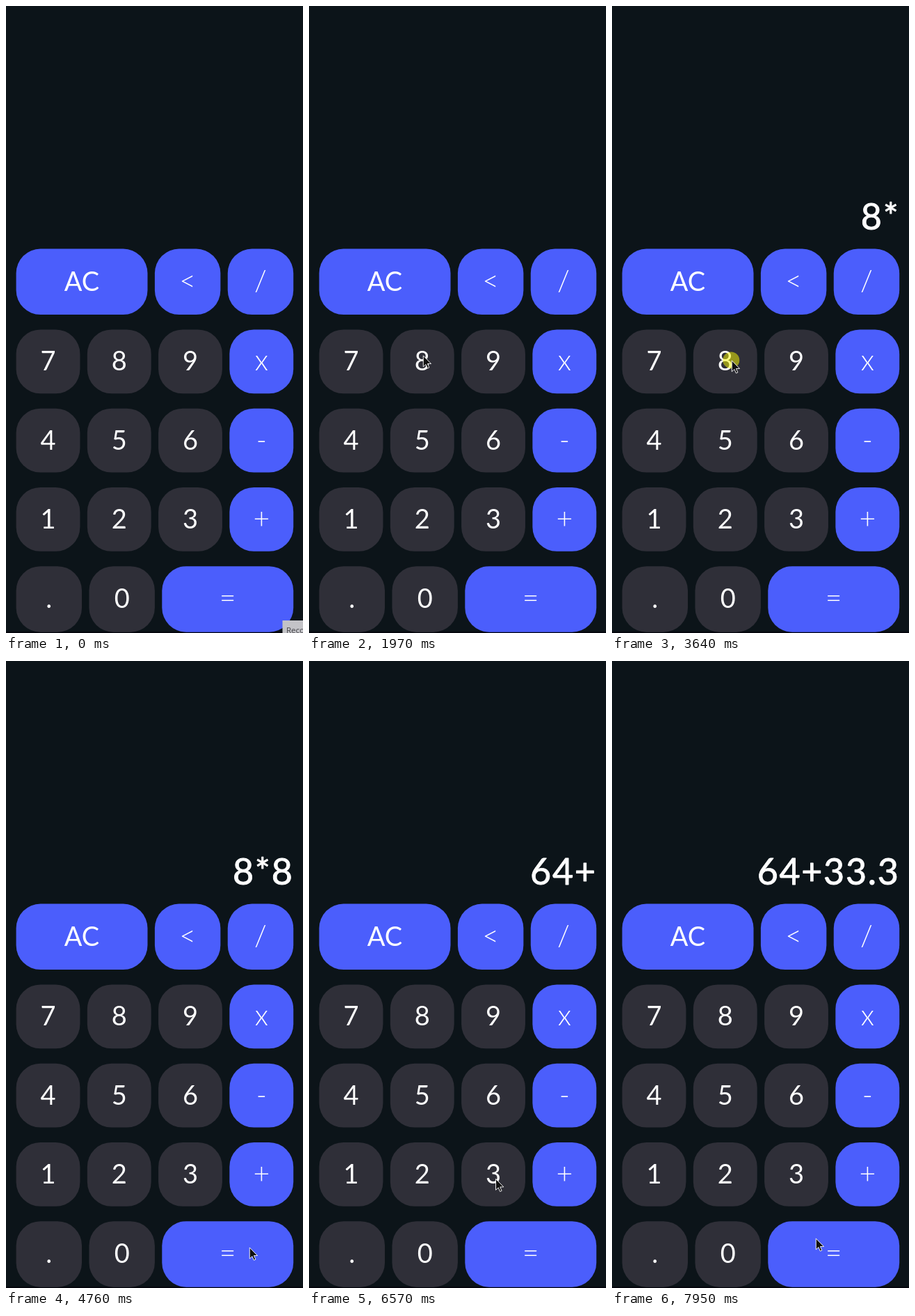
These frames come from a looping animation (427x900 px, 8 s). An HTML page:

```html
<!DOCTYPE html>
<html lang="en">
<head>
<meta charset="utf-8">
<title>Calculator</title>
<style>
  html, body { margin: 0; height: 100%; overflow: hidden; background: #0c1419; }
  svg { display: block; width: 100vw; height: 100vh; }
  text { font-family: Lato, "Open Sans", sans-serif; fill: #fff; text-anchor: middle; }
  #keys text { font-size: 38px; }
  #keys .operator { font-size: 41px; font-weight: 300; }
  #display text { font-size: 52px; stroke: #fff; stroke-width: .9; stroke-linejoin: round; }
  #tip text { font: 11.5px "Open Sans", sans-serif; fill: #45454a; text-anchor: start; }
</style>
</head>
<body>
<svg viewBox="0 0 427 900">
  <rect width="427" height="900" fill="#0c1419"/>
  <rect y="898" width="427" height="2" fill="#05060d"/>
  <g id="keys"></g>
  <g id="display"></g>
  <g id="tip">
    <rect x="397.5" y="882" width="30" height="18" fill="#c3c3c7"/>
    <text x="403" y="900">Reco</text>
  </g>
  <g id="cursor">
    <circle id="press" cx="-1.5" cy="-1" r="12" fill="#ff0" opacity="0"/>
    <path d="M-.5-.5V15.5L3.2 12.1 5.6 17.7 8.1 16.6 5.7 11.1H10.8Z" fill="#111" stroke="#fff" stroke-width=".9"/>
  </g>
</svg>
<script>
const LOOP = 8000;
const RELEASE = 210;  // a press lasts this long, then the reading changes
const TRAVEL = 0.6;   // share of the time between presses spent moving
const BLUE = '#4b5efc', GRAY = '#2f2f38';
const $ = id => document.getElementById(id);

function add(parent, tag, attrs, label) {
  const node = document.createElementNS('http://www.w3.org/2000/svg', tag);
  for (const name in attrs) node.setAttribute(name, attrs[name]);
  if (label) node.textContent = label;
  parent.append(node);
}

// Keys fill each row; "AC" and "=" are two units wide.
const centers = {};
function buildKeys() {
  const left = 14.6, rowWidth = 398.6, gap = 10.4, rowGap = 21.4;
  const span = label => label === 'AC' || label === '=' ? 2 : 1;
  let y = 348.6;
  for (const row of ['AC < /', '7 8 9 x', '4 5 6 -', '1 2 3 +', '. 0 =']) {
    const labels = row.split(' ');
    const units = labels.reduce((sum, label) => sum + span(label), 0);
    const height = (rowWidth - gap * (labels.length - 1)) / units;
    let x = left;
    for (const label of labels) {
      const width = height * span(label);
      const cx = x + width / 2, cy = y + height / 2;
      const fill = /[\d.]/.test(label) ? GRAY : BLUE;
      const kind = fill === BLUE && label !== 'AC' ? 'operator' : 'plain';
      add($('keys'), 'rect', { x, y, width, height, rx: 35, fill });
      add($('keys'), 'text', { x: cx, y: cy + 13, class: kind }, label);
      centers[label] = [cx, cy];
      x += width + gap;
    }
    y += height + rowGap;
  }
}
buildKeys();

// Key, press time and, where the pointer is off its usual spot, the offset from the key's centre
const presses = [
  ['8', 2170, 2, -8], ['x', 2870], ['8', 3560, 10, -1], ['=', 5110, 32, -9], ['+', 6020],
  ['3', 6600], ['3', 6840], ['.', 7230, -17, -6], ['3', 7670], ['=', LOOP, -25, -22]
].map(([key, time, dx = 4, dy = 7]) =>
  ({ key, time, x: centers[key][0] + dx, y: centers[key][1] + dy }));

// The pointer enters from below, then glides to each key and waits there for the release.
const stops = [[650, 376, 900], [1120, 119, 510], [1180, 119, 510]];
for (const { time, x, y } of presses) {
  const leave = stops.at(-1)[0];
  stops.push([leave + TRAVEL * (time - leave), x, y], [time + RELEASE, x, y]);
}

function pointerAt(t) {
  const next = stops.findIndex(stop => stop[0] > t);
  if (next === 0) return [stops[0][1], stops[0][2] + 20];
  const [t0, x0, y0] = stops[next - 1], [t1, x1, y1] = stops[next];
  const u = (t - t0) / (t1 - t0), ease = u * u * (3 - 2 * u);
  return [x0 + (x1 - x0) * ease, y0 + (y1 - y0) * ease];
}

const product = reading => String(reading.split('*').reduce((a, b) => a * b));

function readingAt(t) {
  return presses.filter(p => t >= p.time + RELEASE).reduce((reading, { key }) =>
    key === '=' ? product(reading) : reading + (key === 'x' ? '*' : key), '');
}

const advance = { '*': 24, '.': 14 };
let shown = '';
function show(reading) {
  if (reading === shown) return;
  shown = reading;
  $('display').replaceChildren();
  let right = 412.7;
  for (const c of [...reading].reverse()) {
    const width = advance[c] || 31.8;
    add($('display'), 'text', { x: right - width / 2, y: 321 }, c);
    right -= width;
  }
}

function draw(now) {
  const t = now % LOOP;
  const pressed = presses.some(p => t >= p.time && t < p.time + RELEASE);
  $('cursor').setAttribute('transform', `translate(${pointerAt(t)})`);
  $('press').setAttribute('opacity', pressed ? 0.5 : 0);
  $('tip').setAttribute('opacity', t < 70 ? 1 : t < 120 ? 0.4 : 0);
  show(readingAt(t));
}

const start = performance.now();
function tick() {
  draw(performance.now() - start);
  requestAnimationFrame(tick);
}
tick();
</script>
</body>
</html>
```
